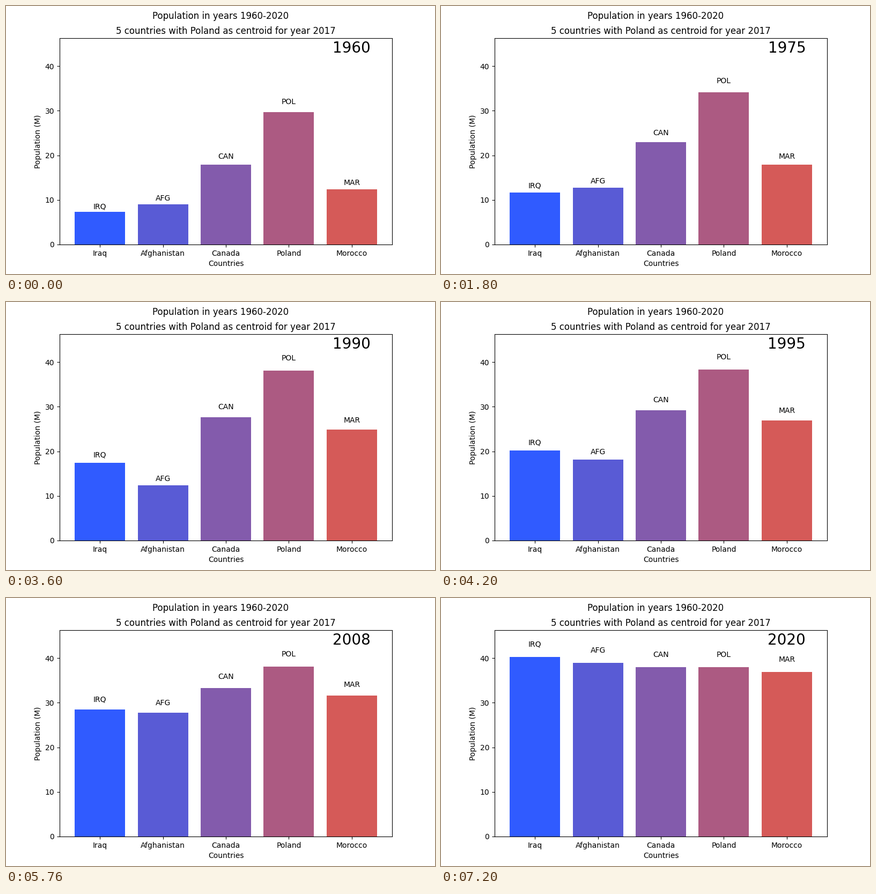
These frames come from a looping animation (800x500 px, 7.32 s). A matplotlib script:

```python
import numpy as np
import matplotlib.pyplot as plt
from matplotlib.animation import FuncAnimation

plt.rcParams["font.family"] = "DejaVu Sans"

FIRST, LAST = 1960, 2020
STEP_MS = 120

# Population in millions at evenly spaced years; uneven growth gets more points.
COUNTRIES = {
    "Iraq": ("IRQ", [7.29, 8.38, 9.92, 11.68, 13.65, 15.65, 17.47,
                     20.13, 23.5, 26.92, 29.74, 35.57, 40.22]),
    "Afghanistan": ("AFG", [9.0, 9.96, 11.17, 12.69, 13.36, 11.94, 12.41,
                            18.11, 20.78, 25.65, 29.19, 34.41, 38.93]),
    "Canada": ("CAN", [17.91, 21.4, 24.52, 27.69, 30.69, 34.0, 38.0]),
    "Poland": ("POL", [29.64, 32.66, 35.57, 38.11, 38.26, 38.04, 37.95]),
    "Morocco": ("MAR", [12.33, 16.0, 20.02, 24.81, 28.79, 32.34, 36.91]),
}


def smooth(points, count):
    """Cubic Hermite curve through evenly spaced points, sampled count times."""
    y = np.array(points)
    slope = np.gradient(y, edge_order=2)
    x = np.linspace(0, len(y) - 1, count)
    i = np.minimum(x.astype(int), len(y) - 2)
    t = x - i
    ease = t * t * (3 - 2 * t)
    bend = t * (1 - t) * (slope[i] * (1 - t) - slope[i + 1] * t)
    return y[i] + (y[i + 1] - y[i]) * ease + bend


years = range(FIRST, LAST + 1)
codes, series = zip(*COUNTRIES.values())
heights = np.array([smooth(points, len(years)) for points in series])
colors = np.linspace((48, 91, 255), (213, 90, 88), len(codes)) / 255

fig, ax = plt.subplots(figsize=(8, 5), dpi=100)
fig.suptitle(f"Population in years {FIRST}-{LAST}")
ax.set_title("5 countries with Poland as centroid for year 2017")
ax.set_xlabel("Countries")
ax.set_ylabel("Population (M)")
bars = ax.bar(list(COUNTRIES), heights[:, 0], color=colors)
ax.set_ylim(0, heights.max() * 1.15)
tags = [ax.text(i, 0, code, ha="center", va="bottom") for i, code in enumerate(codes)]
year_text = ax.text(4, 43, "", ha="center", fontsize=20)


def draw(i):
    for bar, tag, h in zip(bars, tags, heights[:, i]):
        bar.set_height(h)
        tag.set_y(1.05 * h)
    year_text.set_text(str(years[i]))
    return [*bars, *tags, year_text]


anim = FuncAnimation(fig, draw, frames=len(years), interval=STEP_MS, repeat=True, repeat_delay=0)
plt.show()
```
